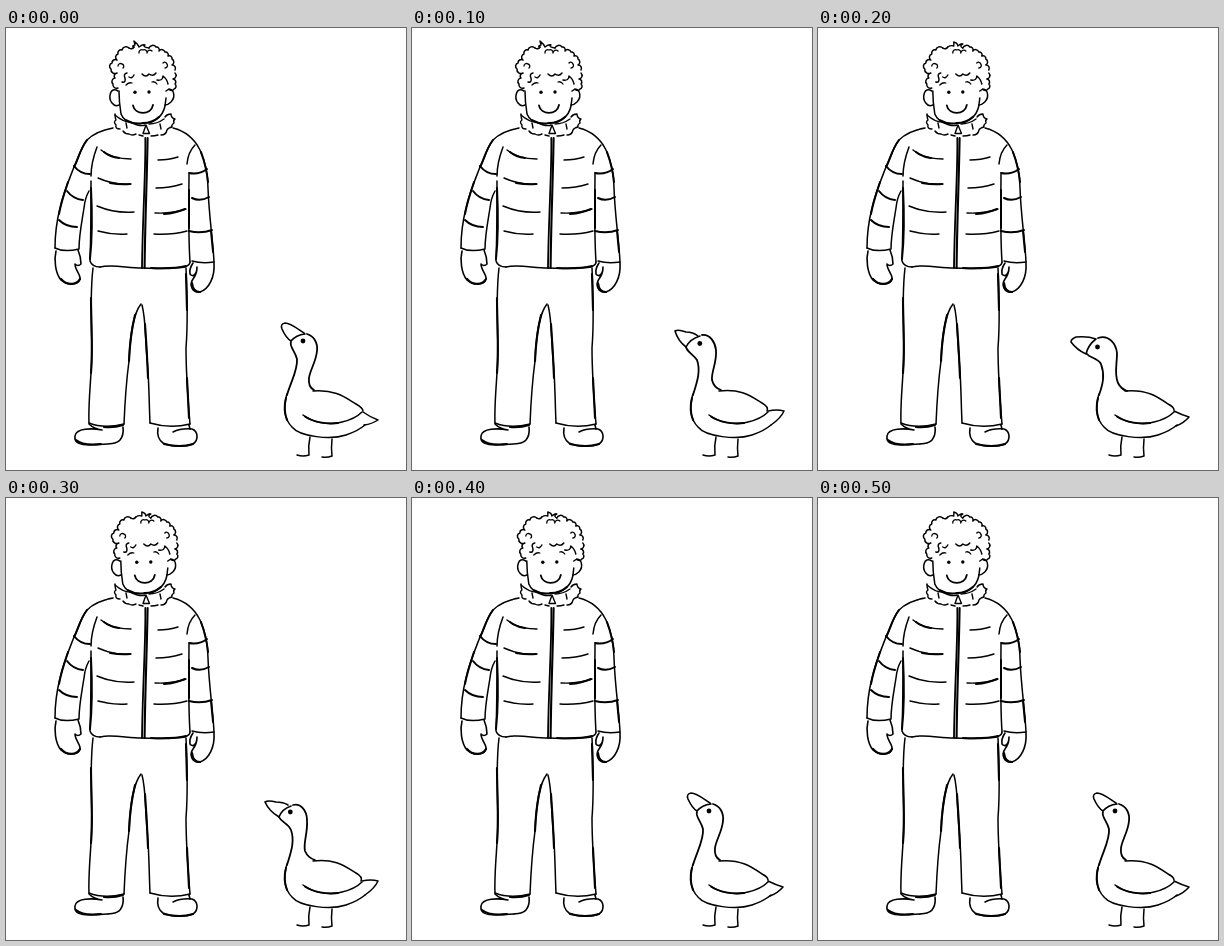
Recreate the animation shown at these times as an HTML page. Size 400 by 442 pixels, loop 600 ms.

```html
<!DOCTYPE html>
<html lang="en">
<head>
<meta charset="utf-8">
<title>Person and goose</title>
<style>
html, body { margin: 0; width: 100%; height: 100%; overflow: hidden; background: #fff; }
svg { display: block; width: 100vw; height: 100vh; }
path { fill: none; stroke: #000; stroke-linecap: round; stroke-linejoin: round; }
circle { fill: #000; }
</style>
</head>
<body>
<svg id="stage" viewBox="0 0 400 442"></svg>
<script>
const NS = 'http://www.w3.org/2000/svg';
const stage = document.getElementById('stage');

function add(parent, tag, attrs = {}) {
  const el = document.createElementNS(NS, tag);
  for (const k in attrs) el.setAttribute(k, attrs[k]);
  return parent.appendChild(el);
}
const group = parent => add(parent, 'g');
const ink = (parent, width, ...paths) =>
  paths.forEach(d => add(parent, 'path', { d, 'stroke-width': width }));
const dot = (parent, cx, cy, r) => add(parent, 'circle', { cx, cy, r });

// A row of round bumps through the given points
function curls(points) {
  const p = points.split(' ').map(s => s.split(',').map(Number));
  return p.map(([x, y], i) => {
    if (!i) return `M${x},${y}`;
    const r = Math.hypot(x - p[i - 1][0], y - p[i - 1][1]) * 0.56;
    return `A${r.toFixed(1)},${r.toFixed(1)} 0 0 1 ${x},${y}`;
  }).join('');
}

function drawJacket(g) {
  // Sleeves
  ink(g, 1.5,
    'M107,100C96,102 86,107 81,112C74,121 72,132 68,139C63,152 57,166 54,180C51,192 49,206 49,220',
    'M49,220C55,223 65,223 73,221C73,207 76,193 78,180Q79,170 83,163',
    'M167,100C179,103 188,110 194,122C199,133 202,145 202,160C203,189 207,212 208,234',
    'M186,233Q196,236 208,234');
  ink(g, 2, 'M81,112C74,121 72,132 68,139', 'M62,154C58,166 55,175 53,186',
    'M195,124C199,135 201,144 202,154', 'M205,203L207,224');
  // Sides and hem
  ink(g, 1.5,
    'M91,119C88,127 85,137 85,148', 'M85,153C85,175 85,208 84,233Q86,239 94,239',
    'M94,239C106,236 121,240 136,240C152,241 172,240 179,239Q184,237 184,234',
    'M189,117Q182,124 181,136', 'M183,146C183,165 182,205 184,234');
  ink(g, 2, 'M85,160C86,180 86,212 84,231', 'M183,162L183,200',
    'M145,240Q168,241 180,238');
  // Quilting
  ink(g, 1.4,
    'M95,122C102,128 113,131 125,131', 'M92,150C103,155 112,157 125,156',
    'M91,178C103,183 115,185 128,184', 'M92,203Q106,207 121,206',
    'M152,132Q163,132 172,129', 'M150,160Q164,160 176,156',
    'M149,185Q166,186 180,181', 'M148,206Q166,207 181,203');
  ink(g, 2, 'M68,138Q74,146 84,146', 'M61,163Q67,171 77,172', 'M53,192Q60,199 71,199',
    'M183,145Q193,147 201,141', 'M186,170Q194,174 203,169',
    'M183,203Q195,206 206,202', 'M98,124Q104,129 113,130', 'M104,155Q115,157 124,156',
    'M158,186Q170,185 179,181');
  // Zip
  ink(g, 1.8, 'M139.3,110C140,138 136.5,192 136,240');
  ink(g, 2.1, 'M141.6,110C141,150 139,195 138.6,240');
  ink(g, 1.4, 'M140,97L137,105.5L143.5,105.5Z');
  // Fluffy collar
  ink(g, 1.4,
    'M109,86Q109,90 110,92Q107,94 110,97Q109,101 114,101',
    'M117,103Q119,106 123,106Q126,108 130,106', 'M133,107L137,108',
    'M145,108Q149,108 152,107', 'M155,107Q160,107 161,102Q162,100 166,99Q165,97 168,95Q167,92 169,91Q165,90 165,86Q161,86 159,89',
    'M109,87Q117,94 124,94', 'M120,95L121,100', 'M154,96L155,101',
    'M124,94Q134,99 139,97', 'M143,96Q151,96 158,91');
}

function drawLegs(g) {
  // Mittens
  ink(g, 1.6,
    'M50,223C48,231 49,245 55,252C62,258 72,257 74,251C75,247 69,242 69,236Q72,239 75,236Q75,229 72,222',
    'M208,235C209,249 203,261 194,264C186,265 183,257 187,251Q191,246 191,239C191,246 187,250 184,246Q183,241 187,235');
  ink(g, 2.2, 'M55,251C61,258 71,257 74,251', 'M186,255Q187,264 194,264');
  // Trousers
  ink(g, 1.5,
    'M87,240C84,265 85,292 86,320C86,345 82,372 83,395', 'M83,395Q98,401 118,396',
    'M118,396C119,371 121,348 123,333C124,312 126,287 135,276',
    'M136,277C140,292 139,310 141,330C143,349 143,373 144,395', 'M144,395Q164,401 184,396',
    'M180,240C181,262 182,295 180,320C180,348 182,372 184,396');
  ink(g, 2.1, 'M85,270C85,292 87,319 85,345', 'M123,333Q124,308 129,287',
    'M139,296Q141,322 142,350', 'M180,246L181,282', 'M181,350L183,390',
    'M98,399Q108,400 117,397');
  // Shoes
  ink(g, 1.6,
    'M83,396Q88,401 96,402C86,400 70,400 69,408C68,415 74,417 84,417C98,416 110,417 114,412Q118,407 117,399',
    'M152,400C151,406 153,412 157,415C165,419 180,419 187,416C193,412 192,403 186,401Q175,400 167,404',
    'M183,397L184,401');
  ink(g, 2, 'M70,412Q77,418 95,416', 'M158,416Q174,420 187,416');
}

function drawHead(g) {
  ink(g, 1.5,
    'M113,63C113,74 114,80 115,86C117,91 122,95 127,95',
    'M137,95C148,96 157,88 159,78L160,70',
    'M112,63C104,58 102,70 106,75Q109,79 113,77',
    'M160,63C168,57 170,69 165,74Q162,77 159,77');
  ink(g, 2, 'M120,92Q129,97 137,95Q146,95 153,89');
  ink(g, 1.8, 'M127,77.5C129,87.5 145,87.5 147,77');
  dot(g, 129, 64.3, 1.7);
  dot(g, 143, 64, 1.7);
  // Hair edge, fringe and loose curls
  ink(g, 1.5,
    curls('112,60 107,56 109,50 111,45 105,41 106,35 111,32 112,26 116,22 123,20'),
    curls('143,20 150,19 153,23 159,24 162,28 166,31 166,37 169,42'),
    curls('169,45 167,51 169,56 168,61 163,61'),
    'M123,20Q126,22 128,19',
    'M116,54Q120,55 119,50Q117,46 121,45M123,49Q126,51 128,47',
    'M136,46Q140,50 143,46Q147,49 150,45', 'M151,52Q157,53 157,48Q161,51 162,56');
  ink(g, 1.3,
    curls('133,25 137,22 141,25 146,23'), curls('112,38 116,36 117,40'),
    curls('157,35 161,36 159,40'),
    'M120,57Q123,54 126,55', 'M146,54Q149,53 151,56');
}

const tufts = [
  'M128,19Q125,18 129,17L128,13Q132,16 133,19Q137,16 139,17Q136,19 143,20',
  'M128,19Q131,17 134,18L134,14Q138,15 138,18Q142,15 143,16Q139,18 143,20'
];

function drawGoose(g) {
  ink(g, 1.5,
    'M281,366C277,378 278,391 286,399C294,409 325,412 340,407Q352,403 359,397',
    'M304,409Q302,418 303,427Q297,429 291,427',
    'M326,411Q325,420 326,428Q321,430 316,429');
  ink(g, 1.5, 'M297,387C306,394 323,398 336,394Q349,391 356,384');
  ink(g, 2, 'M299,388.5C307,394 320,396.5 332,395', 'M280,370Q277,382 281,392');
}

// Bill, head with back of neck, front of neck, eye
const necks = [
  ['M298,305C293,302 285,295 279,295Q274,296 276,301Q280,310 285,313Q290,307 299,306',
   'M301,306C308,308 312,315 311,323C310,334 304,342 303,350Q302,359 308,362',
   'M285,314C283,318 289,323 291,331C292,342 285,353 281,367', 297, 313],
  ['M286,308Q281,304 274,304Q266,301 263,303Q266,313 274,319Q278,311 288,308',
   'M290,307C298,306 303,314 304,322C305,335 299,344 300,352Q302,360 309,362',
   'M274,319C275,324 281,326 285,332C289,343 285,354 281,367', 287.8, 315.5],
  ['M278,311Q270,308 258,309Q253,311 253,314Q259,322 268,326Q270,317 278,311',
   'M280,310C291,306 298,316 299,325C299,337 296,346 300,355Q303,361 309,363',
   'M269,326C272,330 280,330 283,336C287,347 285,356 281,367', 279.5, 319],
  ['M282,307Q277,304 270,304Q262,302 259,304Q263,313 273,319Q276,311 285,308',
   'M287,307C295,305 301,313 301,322C302,335 297,345 299,353Q302,360 309,362',
   'M273,319C275,324 282,325 285,332C289,343 285,354 281,367', 284.3, 314]
];
const backs = [
  ['M307,363C329,361 340,370 350,376Q357,380 357,383', 'M357,384Q364,389 372,392Q366,396 358,397'],
  ['M307,363C329,360 340,369 350,375Q357,379 355,383', 'M356,383Q365,381 372,383Q369,390 359,397'],
  ['M307,363C329,361 340,369 350,376Q356,379 356,382', 'M356,383Q364,387 371,389Q366,395 358,398']
];

const sets = { neck: [], back: [], tuft: [] };
const person = group(stage);
drawJacket(person);
drawLegs(person);
const head = group(person);
drawHead(head);
tufts.forEach(d => {
  const g = group(head);
  ink(g, 1.4, d);
  sets.tuft.push(g);
});

const goose = group(stage);
drawGoose(goose);
necks.forEach(([bill, nape, front, x, y]) => {
  const g = group(goose);
  ink(g, 1.6, bill);
  ink(g, 1.8, nape, front);
  dot(g, x, y, 2.4);
  sets.neck.push(g);
});
backs.forEach(paths => {
  const g = group(goose);
  ink(g, 1.5, ...paths);
  sets.back.push(g);
});

// Drawings held for one step each: neck, back, tuft
const STEP = 100;
const steps = [[0, 0, 0], [1, 1, 0], [2, 2, 1], [3, 1, 1], [0, 2, 1], [0, 2, 1]];
const pick = (list, n) =>
  list.forEach((el, i) => el.setAttribute('visibility', i === n ? 'visible' : 'hidden'));

function show(time) {
  const [neck, back, tuft] = steps[Math.floor(Math.max(0, time) / STEP) % steps.length];
  pick(sets.neck, neck);
  pick(sets.back, back);
  pick(sets.tuft, tuft);
  head.setAttribute('transform', `translate(${tuft * 1.8} 0)`);
}

const start = performance.now();
function tick() {
  show(performance.now() - start);
  requestAnimationFrame(tick);
}
tick();
</script>
</body>
</html>
```
